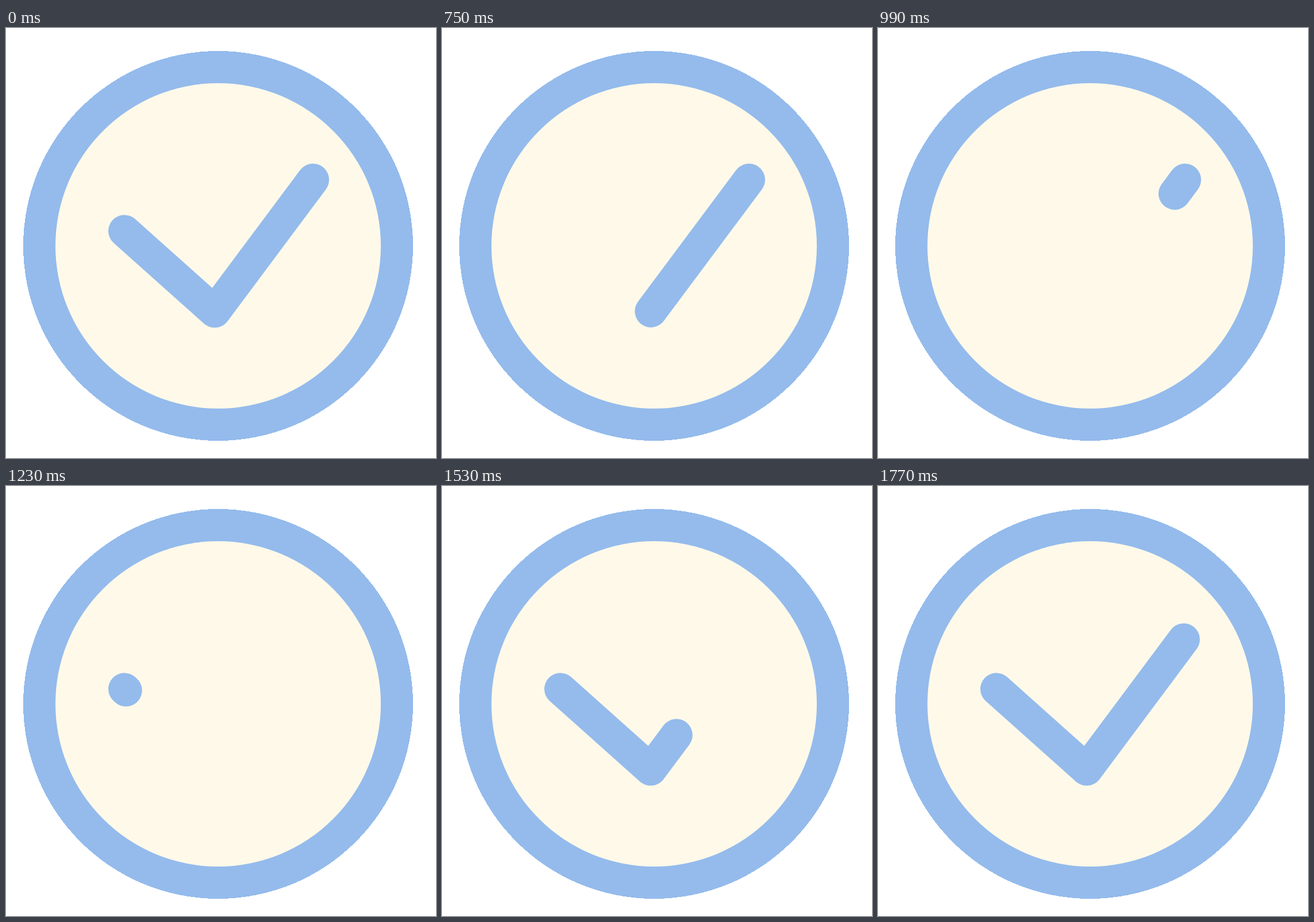
Write an HTML page that moves like this. It is 748x748 px and loops after 1.8 s.

```html
<!DOCTYPE html>
<html lang="en">
<head>
<meta charset="utf-8">
<title>Check mark</title>
<style>
  @property --tick {
    syntax: "<number>";
    inherits: true;
    initial-value: 0;
  }

  html, body {
    margin: 0;
    width: 100%;
    height: 100%;
    overflow: hidden;
    background: #fff;
  }

  svg {
    display: block;
    width: 100vw;
    height: 100vh;
  }

  .rim { fill: #94bbec; shape-rendering: crispEdges; }
  .face { fill: #fff9e9; }

  /* One tick is 30 ms: wipe during ticks 16-36, draw during 40-60. */
  .check {
    --out: clamp(0, (var(--tick) - 16) / 20, 1);
    --in: clamp(0, (var(--tick) - 40) / 20, 1);
    --wiped: (var(--out) * var(--out) * (3 - 2 * var(--out)));
    --drawn: (var(--in) * var(--in) * (3 - 2 * var(--in)));
    --before: clamp(0, 36 - var(--tick), 1);
    --after: clamp(0, var(--tick) - 40, 1);
    fill: none;
    stroke: #94bbec;
    stroke-width: 56px;
    stroke-linecap: round;
    stroke-linejoin: round;
    stroke-dasharray: 1000px 2000px;
    stroke-dashoffset: calc(1000px * (2 * var(--after) - var(--wiped) - var(--drawn)));
    opacity: calc(var(--before) + var(--after));
    animation: run 1.8s steps(60) infinite;
  }

  @keyframes run {
    from { --tick: 0; }
    to { --tick: 60; }
  }
</style>
</head>
<body>
<svg viewBox="0 0 748 748">
  <circle class="rim" cx="369" cy="379" r="339"/>
  <circle class="face" cx="369" cy="379" r="283"/>
  <path class="check" pathLength="1000" d="M206 353.2 L363 493.3 L534 264"/>
</svg>
</body>
</html>
```
